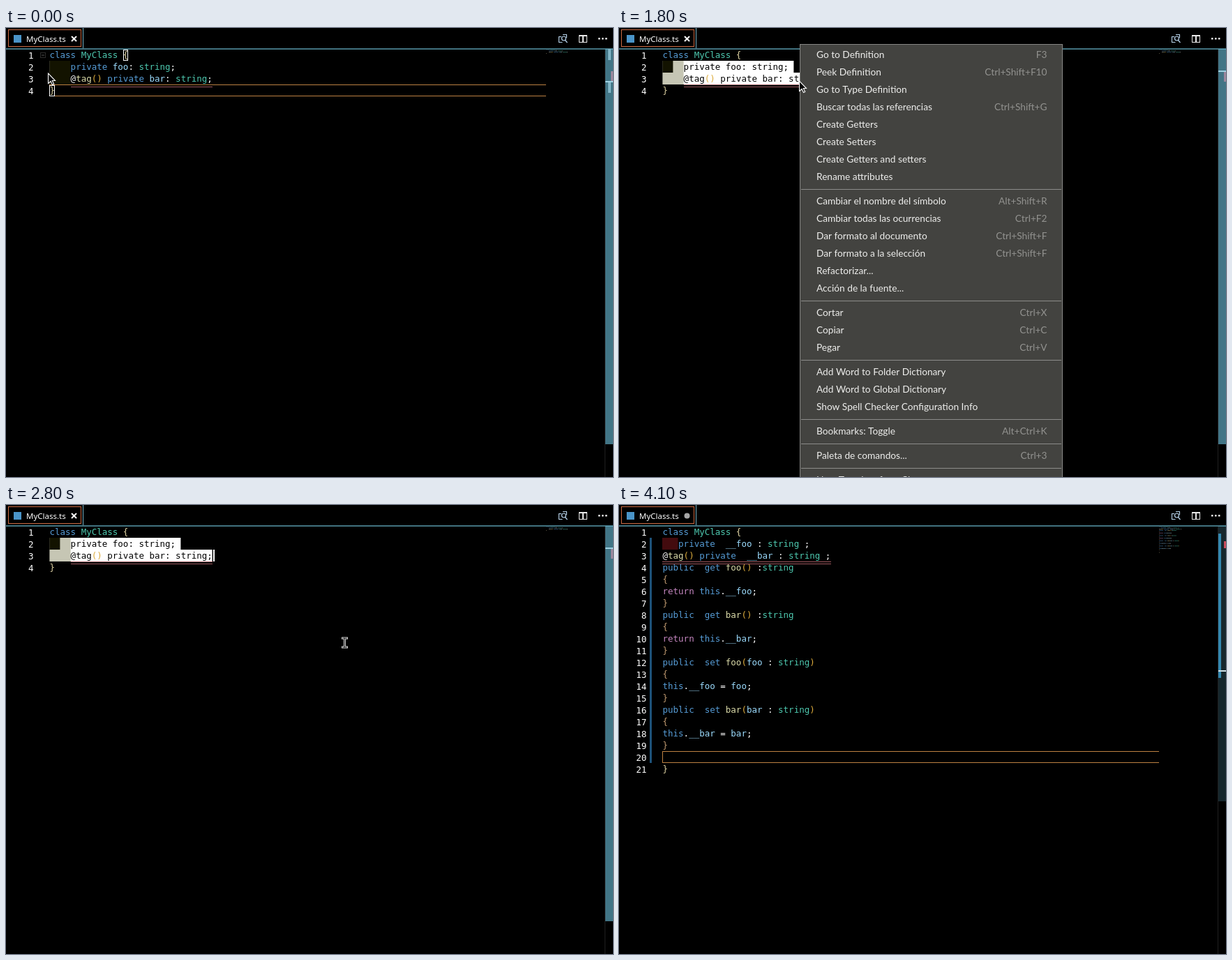
Write an HTML page with a canvas that moves like this. It is 870 by 644 pixels and loops after 4.2 s.

```html
<!DOCTYPE html>
<html lang="en">
<head>
<meta charset="utf-8">
<title>Editor</title>
<style>
html, body { margin: 0; height: 100%; overflow: hidden; background: #000; }
canvas { display: block; }
</style>
</head>
<body>
<canvas id="stage" width="870" height="644"></canvas>
<script>
const c = document.getElementById('stage').getContext('2d');
const LOOP = 4200, STEP = 100;
const X0 = 62.5, CW = 7.525, LH = 17;
const MONO = '12.5px "DejaVu Sans Mono", monospace';
const TAB = '11.5px "Noto Sans", sans-serif';
const MENU = '13.7px Lato, sans-serif';

const before = ['class MyClass {', '    private foo: string;', '    @tag() private bar: string;', '}'];
const getter = n => [`public  get ${n}() :string`, '{', `return this.__${n};`, '}'];
const setter = n => [`public  set ${n}(${n} : string)`, '{', `this.__${n} = ${n};`, '}'];
const after = ['class MyClass {', '   private  __foo : string ;', '@tag() private  __bar : string ;',
  ...getter('foo'), ...getter('bar'), ...setter('foo'), ...setter('bar'), '', '}'];

// null marks a separator
const menu = [
  ['Go to Definition', 'F3'], ['Peek Definition', 'Ctrl+Shift+F10'], ['Go to Type Definition'],
  ['Buscar todas las referencias', 'Ctrl+Shift+G'], ['Create Getters'], ['Create Setters'],
  ['Create Getters and setters'], ['Rename attributes'], null,
  ['Cambiar el nombre del símbolo', 'Alt+Shift+R'], ['Cambiar todas las ocurrencias', 'Ctrl+F2'],
  ['Dar formato al documento', 'Ctrl+Shift+F'], ['Dar formato a la selección', 'Ctrl+Shift+F'],
  ['Refactorizar...'], ['Acción de la fuente...'], null,
  ['Cortar', 'Ctrl+X'], ['Copiar', 'Ctrl+C'], ['Pegar', 'Ctrl+V'], null,
  ['Add Word to Folder Dictionary'], ['Add Word to Global Dictionary'],
  ['Show Spell Checker Configuration Info'], null,
  ['Bookmarks: Toggle', 'Alt+Ctrl+K'], null, ['Paleta de comandos...', 'Ctrl+3'], null,
  ['New Template from Class']];

// time, x, y of the pointer tip
const path = [[0, 60, 65], [300, 98, 68], [600, 85, 57], [700, 85, 57], [800, 198, 58], [900, 198, 58],
  [1000, 262, 66], [1100, 299, 72], [1300, 299, 72], [1700, 262, 76], [1800, 258, 76], [1900, 258, 76],
  [2400, 482, 190], [3500, 482, 190], [3900, 600, -20], [LOOP, 600, -20]];

function pointerAt(t) {
  const i = path.findIndex(k => k[0] > t);
  const [t0, x0, y0] = path[i - 1], [t1, x1, y1] = path[i];
  const k = (t - t0) / (t1 - t0);
  return [x0 + (x1 - x0) * k, y0 + (y1 - y0) * k];
}

function box(x, y, w, h, fill) {
  c.fillStyle = fill;
  c.fillRect(x, y, w, h);
}
function frame(x, y, w, h, color) {
  c.strokeStyle = color;
  c.lineWidth = 1;
  c.strokeRect(x + .5, y + .5, w - 1, h - 1);
}
function text(s, x, y, color, font, align = 'left') {
  c.font = font;
  c.textAlign = align;
  c.fillStyle = color;
  c.fillText(s, x, y);
}
function stroke(d, color, width) {
  c.strokeStyle = color;
  c.lineWidth = width;
  c.stroke(new Path2D(d));
}
const colX = n => X0 + n * CW;
const lineY = n => 30 + (n - 1) * LH;

function tokens(line, depth) {
  return [...line.matchAll(/\w+|[^\w\s]/g)].map(({ 0: s, index }) => {
    let color = '#fff';
    if (/^(class|private|public|get|set|this)$/.test(s)) color = '#569cd6';
    else if (/^(string|MyClass)$/.test(s)) color = '#4ec9b0';
    else if (s == 'return') color = '#c586c0';
    else if (/\w/.test(s)) color = line[index + s.length] == '(' ? '#dcdcaa' : '#9cdcfe';
    else if (/[()]/.test(s)) color = '#dcab3c';
    else if (/[{}]/.test(s)) color = depth ? '#c09a70' : '#e0d4a4';
    return { s, index, color };
  });
}
const parse = lines => lines.map((l, i) => tokens(l, i > 0 && i < lines.length - 1));
const oldCode = parse(before), newCode = parse(after);

function drawLine(list, n, selected) {
  for (const { s, index, color } of list)
    text(s, colX(index), lineY(n) + 13, selected && !/[()]/.test(s) ? '#000' : color, MONO);
}

function drawCode(code) {
  code.forEach((list, i) => {
    text(i + 1, 39.5, lineY(i + 1) + 14, '#fff', MONO, 'right');
    drawLine(list, i + 1);
    c.globalAlpha = .5;
    for (const { s, index, color } of list)
      for (let k = 0; k < s.length; k++)
        box(774 + index + k, 30.5 + i * 1.85, .8, 1, color);
    c.globalAlpha = 1;
  });
}

function select(n, from, to) {
  const x = colX(from), w = (to - from) * CW;
  c.save();
  c.beginPath();
  c.rect(x, lineY(n), w, LH);
  c.clip();
  box(x, lineY(n), w, LH, '#fff');
  box(X0, lineY(n), 4 * CW, LH, '#c6c6b4');
  drawLine(oldCode[n - 1], n, true);
  c.restore();
}

function currentLine(n) {
  const y = lineY(n);
  box(62, y, 712, 1, '#bd8142');
  box(62, y + 16, 712, 1, '#bd8142');
  box(62, y, 1, LH, '#bd8142');
}
function errorLine(x, y, w) {
  box(x, y, w, 1, '#a15a60');
  box(x, y + 3, w, 1, '#a15a60');
}

function drawTop(dirty) {
  box(0, 29, 870, 2, '#41727f');
  box(110, 0, 1, 29, '#79b4c6');
  frame(3, 2, 105, 25, '#cb6a42');
  box(11, 10, 11, 11, '#4a94c8');
  text('MyClass.ts', 29, 19.5, '#fff', TAB);
  if (dirty) {
    c.fillStyle = '#a6a6a6';
    c.beginPath();
    c.arc(97.5, 15.5, 4, 0, 7);
    c.fill();
  } else stroke('M94 12l7 7m0-7l-7 7', '#fff', 2);
  stroke('M797.5 20.5H792.5V12.5H796M798 9.5H803.5V14', '#b8d4ec', 1.1);
  stroke('M802.5 15a3 3 0 1 0-6 0a3 3 0 1 0 6 0M801.5 17.5l3 3.5', '#b8d4ec', 1.2);
  frame(821, 10, 12, 11, '#e8e8e8');
  box(821, 10, 12, 2, '#e8e8e8');
  box(826, 10, 2, 11, '#e8e8e8');
  for (const x of [849, 854, 859]) box(x, 14, 2.5, 2.5, '#e8e8e8');
}

function drawRuler(t, done, selecting) {
  box(858, 31, 1, 613, '#202020');
  if (t < 800) for (const y of [30, 77]) box(863, y, 4, 16, '#a0a0a0');
  if (t >= 3200) box(859, 41, 4, 207, '#2479a4');
  if (!done) box(867, 62, 3, 15, '#e0303c');
  else if (t >= 3400) box(867, 52, 3, 10, '#e0303c');
  else if (t >= 3100) box(867, 238, 3, 10, '#e0303c');
  const y = done ? 237 : selecting ? 61 : t < 700 ? 76 : 45;
  box(859, y, 11, 2, '#e8e8e8');
  const fade = Math.min(1, Math.max(0, (t - 3500) / 600));
  box(859, 30, 11, done ? 395 : 567, `rgba(111,195,223,${.6 - .4 * fade})`);
}

function drawMenu(px, py) {
  box(259, 23, 377, 621, '#868684');
  box(260, 24, 375, 620, '#434340');
  let y = 26;
  for (const item of menu) {
    if (!item) {
      box(261, y + 5, 373, 1, '#8c8c8a');
      y += 10;
      continue;
    }
    if (px > 260 && py >= y && py < y + 25) box(260, y, 375, 25, '#e0434c');
    text(item[0], 283, y + 16.5, '#eeeeec', MENU);
    if (item[1]) text(item[1], 613.5, y + 16.5, '#92928f', MENU, 'right');
    y += 25;
  }
}

function drawPointer(x, y, arrow) {
  c.save();
  if (arrow) {
    c.translate(x, y);
    const p = new Path2D('M.5 0V14.5L4 11.5L6.5 16.5L8.7 15.5L6.3 10.5H10.5Z');
    c.fillStyle = '#000';
    c.fill(p);
    c.strokeStyle = '#fff';
    c.lineWidth = 1.1;
    c.stroke(p);
  } else {
    c.translate(Math.round(x + 3) + .5, Math.round(y + 8) - .5);
    const d = 'M-3 -6.5H3M0 -6.5V6.5M-3 6.5H3';
    c.lineCap = 'square';
    stroke(d, '#ddd', 3);
    stroke(d, '#111', 1);
  }
  c.restore();
}

function draw(time) {
  const t = Math.floor(time % LOOP / STEP) * STEP;
  const done = t >= 2900, selecting = t >= 800 && !done, open = t >= 1800 && t < 2800;
  const [px, py] = pointerAt(t);
  box(0, 0, 870, 644, '#000');

  if (done) {
    box(62, lineY(2), 3 * CW, LH, '#430b0e');
    if (t >= 3200) box(44, 47, 3, 323, '#1d527a');
    currentLine(20);
    drawCode(newCode);
    if (t >= 3400) errorLine(62, 81, 242);
    else if (t >= 3100) errorLine(62, 370, 8);
    if (t < 3600) box(63, lineY(20), 2, LH, '#fff');
  } else {
    box(62, lineY(2), 4 * CW, 2 * LH, '#131300');
    box(62, lineY(2), 1, 2 * LH, '#2b2b20');
    errorLine(93, 81, 203);
    if (!selecting) currentLine(t < 700 ? 4 : 2);
    drawCode(oldCode);
    if (selecting) {
      const end = t < 1000 ? 18 : t < 1100 ? 27 : 31;
      select(2, 2, 25);
      select(3, 0, end);
      box(Math.round(colX(end)) + 1, lineY(3), 2, LH, '#fff');
    } else {
      frame(168, 31, 7, 16, '#fff');
      frame(62, 82, 8, 16, '#fff');
      if (t >= 700) box(78, lineY(2), 2, LH, '#fff');
      if (t < 400) {
        c.globalAlpha = 1 - t / 400;
        frame(49, 35, 8, 8, '#2c2c2c');
        box(51, 38.5, 4, 1, '#555');
        c.globalAlpha = 1;
      }
    }
  }

  drawTop(done);
  drawRuler(t, done, selecting);
  if (open) drawMenu(px, py);
  drawPointer(px, py, open || px < 62 || py < 30);
}

const start = performance.now();
function tick() {
  draw(performance.now() - start);
  requestAnimationFrame(tick);
}
tick();
</script>
</body>
</html>
```
